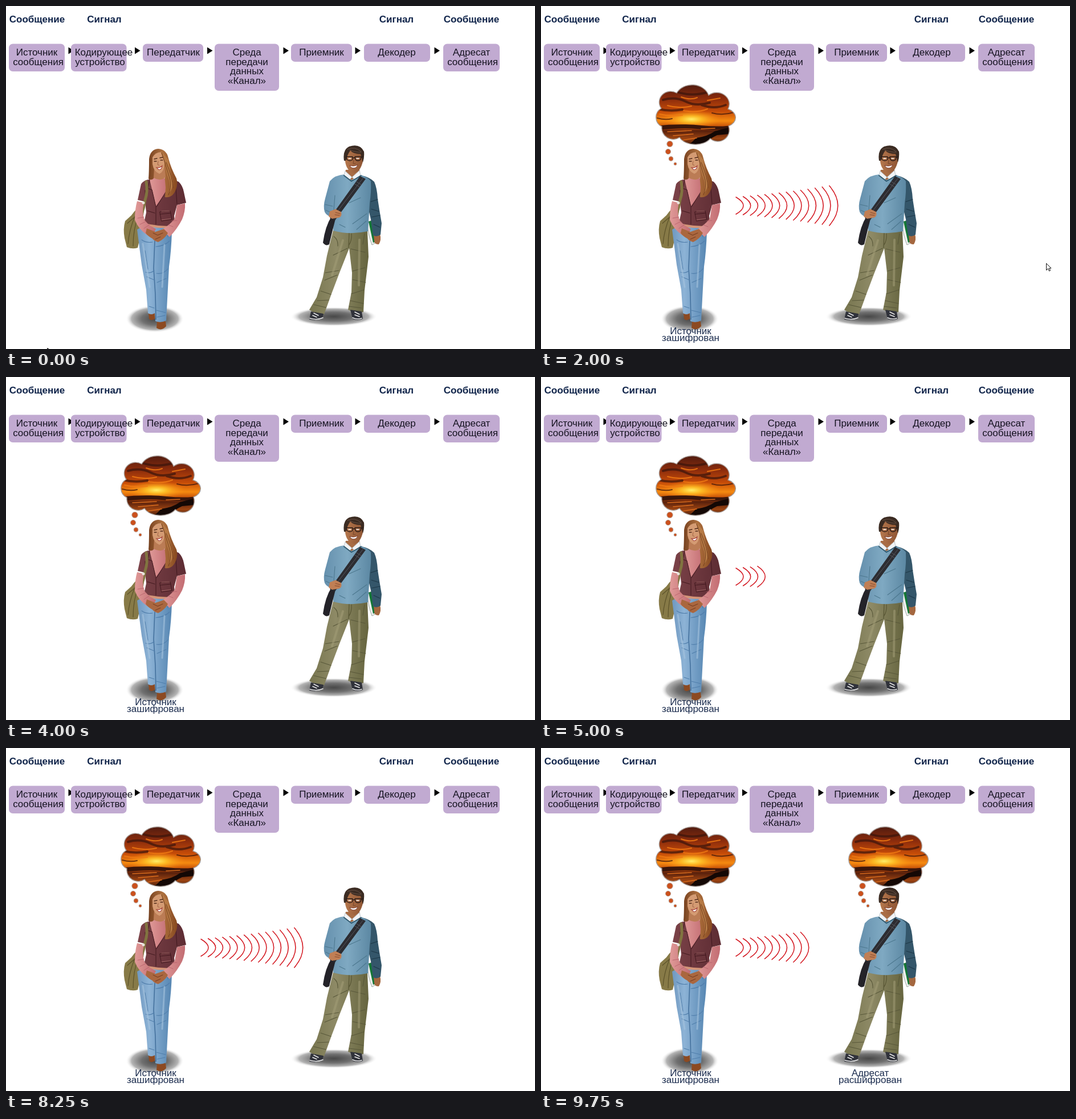
An HTML page for the animation above (10000 ms loop, 928 by 603 pixels).

```html
<!DOCTYPE html>
<html lang="ru">
<head>
<meta charset="utf-8">
<title>Передача сообщения</title>
<style>
  html, body { margin: 0; width: 100%; height: 100%; overflow: hidden; background: #fff; }
  svg { display: block; }
  text { font: 17px "Liberation Sans", Arial, sans-serif; text-anchor: middle; fill: #151320; }
  .title { font-weight: bold; fill: #10244a; }
  .caption { fill: #1b2c4e; }
  .line { fill: none; stroke-linecap: round; stroke-linejoin: round; }
</style>
</head>
<body>
<svg width="928" height="603" viewBox="0 0 928 603">
  <defs>
    <radialGradient id="shade">
      <stop offset="0" stop-color="#484848"/><stop offset=".45" stop-color="#707070"/>
      <stop offset=".8" stop-color="#b4b4b4"/><stop offset="1" stop-color="#fff" stop-opacity="0"/>
    </radialGradient>
    <linearGradient id="sky" x2="0" y2="1">
      <stop offset="0" stop-color="#4a1a10"/><stop offset=".25" stop-color="#8c2c0c"/>
      <stop offset=".45" stop-color="#c64c08"/><stop offset=".6" stop-color="#f58a10"/>
      <stop offset=".7" stop-color="#c04a08"/><stop offset=".76" stop-color="#58200c"/>
      <stop offset=".88" stop-color="#9c4412"/><stop offset="1" stop-color="#341208"/>
    </linearGradient>
    <radialGradient id="sun">
      <stop offset="0" stop-color="#fff06a"/><stop offset=".35" stop-color="#ffc428" stop-opacity=".85"/>
      <stop offset="1" stop-color="#ff8a10" stop-opacity="0"/>
    </radialGradient>
    <linearGradient id="denim"><stop offset="0" stop-color="#6f98c0"/><stop offset=".35" stop-color="#8db3d6"/><stop offset="1" stop-color="#5686b2"/></linearGradient>
    <linearGradient id="hair"><stop offset="0" stop-color="#794321"/><stop offset=".5" stop-color="#ad703f"/><stop offset="1" stop-color="#87491f"/></linearGradient>
    <linearGradient id="jacket"><stop offset="0" stop-color="#7b4248"/><stop offset="1" stop-color="#5d2c33"/></linearGradient>
    <linearGradient id="pink"><stop offset="0" stop-color="#e09a98"/><stop offset="1" stop-color="#c26c72"/></linearGradient>
    <linearGradient id="knit"><stop offset="0" stop-color="#6590ad"/><stop offset=".5" stop-color="#7fa9c2"/><stop offset="1" stop-color="#5c88a3"/></linearGradient>
    <linearGradient id="khaki"><stop offset="0" stop-color="#77754f"/><stop offset=".45" stop-color="#8e8a66"/><stop offset="1" stop-color="#66653f"/></linearGradient>
    <linearGradient id="skin"><stop offset="0" stop-color="#b5774d"/><stop offset="1" stop-color="#8f5634"/></linearGradient>
    <path id="puff" d="M238,153A30 25 0 0 1 294,157A22 20 0 0 1 328,181A22 16.5 0 0 1 329,211A20 20 0 0 1 297,233A30 20 0 0 1 243,231A20 20 0 0 1 212,212A18 18 0 0 1 211,180A20 19 0 0 1 238,153Z"/>
    <clipPath id="puffClip"><use href="#puff"/></clipPath>
    <g id="thought">
      <g clip-path="url(#puffClip)">
        <rect x="198" y="136" width="146" height="110" fill="url(#sky)"/>
        <ellipse cx="264" cy="199" rx="52" ry="16" fill="url(#sun)"/>
        <g class="line" stroke="#3a140c" stroke-opacity=".7" stroke-width="4">
          <path d="M236,150q25,10 55,2M214,165q22,-6 40,3t42,2M282,174q22,8 42,0M206,181q20,5 42,1"/>
          <path d="M300,188q18,5 38,-1M204,197q14,4 26,1" stroke-width="2"/>
        </g>
        <g class="line" stroke="#f07a12" stroke-width="2" stroke-opacity=".85">
          <path d="M246,160q16,6 28,1M222,175q20,6 42,1M250,184q25,4 42,-3M292,166l22,-4M208,190q20,5 40,2"/>
        </g>
        <path d="M198,211q45,-5 84,-1t62,-2v8q-40,3 -70,0t-76,3z" fill="#3a160b"/>
        <path d="M328,214l-23,6q-12,9 -33,12l-12,12h23q15,-12 26,-17l21,-2z" fill="#140805"/>
        <path class="line" d="M222,221l42,-2M232,228l35,-3M248,236l25,-4M281,216l24,-1" stroke="#d86a1c" stroke-width="1.6"/>
      </g>
      <use href="#puff" fill="none" stroke="#a59a95" stroke-width="1.4"/>
      <g fill="#cb501c" stroke="#b9a69c">
        <circle cx="226" cy="242.5" r="5.2"/><circle cx="223" cy="256" r="4.6"/>
        <circle cx="228" cy="268.5" r="3.9"/><circle cx="235.5" cy="277.5" r="2.4"/>
      </g>
    </g>
  </defs>

  <rect width="928" height="603" fill="#fff"/>
  <g id="scheme"></g>

  <ellipse cx="261" cy="550" rx="51" ry="24" fill="url(#shade)"/>
  <ellipse cx="575" cy="546" rx="76" ry="17" fill="url(#shade)"/>

  <g id="woman">
    <path d="M250,540q5,-4 11,0l1,9q-6,6 -11,1zM265,555q8,-4 15,0l1,8q-8,9 -17,3z" fill="#8c4a22"/>
    <path d="M240,348q-11,7 -20,20l-11,10q-4,14 -1,30l4,16q10,4 19,1l5,-22q4,-25 6,-43z" fill="#877a47"/>
    <path class="line" d="M226,370q-10,24 -12,48M232,370q-9,22 -9,52M213,382l14,-12" stroke="#5d532b" stroke-width="1.2"/>
    <path d="M239,388h49l3,8q-1,34 -5,62l-2,38 -3,57q-10,5 -19,1l-1,-14q-6,4 -12,0l-3,-41 -8,-44 -8,-62z" fill="url(#denim)"/>
    <path class="line" d="M261,413l-2,48 3,46 1,44" stroke="#44719d" stroke-width="1.6"/>
    <path class="line" d="M245,468q8,3 15,-3M247,476l14,6M264,470q12,2 20,-8M265,486l16,-7M251,528l9,3M264,535l16,4M265,547l14,-3M238,411q8,6 19,4M263,423q15,-1 24,-10M280,393l4,13M244,430l5,33" stroke="#507eab" stroke-width="1.1"/>
    <path class="line" d="M240,418l12,76M278,420l-4,74" stroke="#a5c4de" stroke-opacity=".6" stroke-width="3"/>
    <path d="M242,382l49,2 -2,6q-23,1 -47,-3z" fill="#d49578"/>
    <path d="M251,304q15,-5 32,0l3,28 -22,24 -9,-22z" fill="url(#pink)"/>
    <path d="M252,305l11,47 23,-32 -3,-16q11,1 20,5 7,7 9,18l4,19 -16,4 -5,19 2,17q-29,3 -55,-5l4,-18 -2,-19 -13,-3 6,-28q6,-8 15,-8z" fill="url(#jacket)"/>
    <path class="line" d="M252,305l-3,16 7,2 7,30v31M283,305l6,15 -7,4 -18,29M270,362l18,-2 3,15 -18,3zM270,366l19,-2M298,321l2,27M244,324l1,22M248,360l13,4" stroke="#41181e" stroke-width="1"/>
    <path class="line" d="M273,361l14,-1M273,376l16,-2" stroke="#b87c78" stroke-width=".7"/>
    <path class="line" d="M246,309q3,18 -2,32 -2,14 -7,28" stroke="#817440" stroke-width="5"/>
    <path d="M230,343l12,3q-4,18 1,30 7,10 20,16l-5,10 -10,1q-16,-11 -22,-27 0,-19 4,-33z" fill="url(#pink)"/>
    <path d="M300,350l14,-3q1,13 -5,28 -8,16 -22,31l-13,-13q14,-9 22,-19z" fill="url(#pink)"/>
    <path class="line" d="M231,373l11,-2M235,384l10,-5M242,391l9,-6M300,377l-9,1M293,388l-8,-3" stroke="#b8636c" stroke-width=".9"/>
    <path d="M247,391l15,6 15,-5 7,7q-5,10 -17,16 -7,-2 -10,-6 -8,-4 -12,-10z" fill="#aa673f"/>
    <path class="line" d="M258,399l8,4 9,-4M262,410l9,-4" stroke="#71391e" stroke-width="1"/>
    <circle cx="241" cy="346" r="2.5" fill="#e8e2dc"/>
    <path d="M267,251q-14,1 -16,18 0,22 -1,35 7,4 11,-4l17,-3 2,22 -1,17q13,2 19,-13 4,-10 1,-20 -10,-19 -14,-35 -3,-16 -18,-17z" fill="url(#hair)"/>
    <path d="M260,286l18,-5 2,20q-9,8 -21,1z" fill="#bb7c55"/>
    <path d="M257,266q5,-9 15,-9 6,8 6,20 -1,15 -9,18 -10,-4 -12,-17z" fill="#d49b73"/>
    <path d="M271,254q3,12 8,20 1,17 7,32 3,13 -1,24 10,-10 7,-24 -5,-20 -7,-36z" fill="#b67a45"/>
    <path class="line" d="M273,258q9,27 15,48 2,14 -3,26M253,270l-1,30M281,275q11,25 12,45" stroke="#74401e" stroke-width="1"/>
    <path class="line" d="M260,269l5,-1M270,267l5,-1M260,273h4M271,271h4" stroke="#4f2b1b" stroke-width="1.3"/>
    <path class="line" d="M267,273l-1,6 3,1" stroke="#a26344" stroke-width="1"/>
    <path d="M264,284q6,1 10,-3 -1,7 -6,7z" fill="#fff" stroke="#a84840" stroke-width="1.2"/>
  </g>

  <g id="man">
    <path d="M574,394l60,2 2,45 -7,59 -2,38q-13,3 -27,-4l6,-31 1,-34 -5,-43 -17,43 -14,37 -13,36q-13,1 -26,-8l13,-22 11,-35 7,-38z" fill="url(#khaki)"/>
    <path class="line" d="M602,398l-1,27M606,400q1,13 -5,21" stroke="#5a5836" stroke-width="1.3"/>
    <path class="line" d="M575,405q8,6 7,17M599,426l-25,12M584,465l-24,4M581,473l-22,9M570,507l-18,-6M566,517l-20,1M561,530l-21,-5M608,466l22,-6M608,481l23,5M606,506l22,-7M604,518l23,5M602,528l22,3M629,400l-3,19M605,427l25,6" stroke="#59583a" stroke-width="1.1"/>
    <path class="line" d="M591,412l-19,61M620,411l-1,80" stroke="#a29d77" stroke-opacity=".55" stroke-width="4"/>
    <path d="M535,537l22,4 -2,8q-10,5 -23,2zM604,534l20,3 2,13q-9,4 -18,0z" fill="#30323a"/>
    <path class="line" d="M533,549q12,4 23,-1M608,548q8,4 16,1M540,540l8,4M612,538l8,4M538,544l7,3M612,543l8,3" stroke="#e9e9e9" stroke-width="1.6"/>
    <path d="M633,380l12,-4 6,39 -9,5q-7,-18 -9,-40z" fill="#eef0ee" stroke="#88918b" stroke-width=".8"/>
    <path d="M636,379l9,-3 6,38 -7,2z" fill="#147636"/>
    <path d="M645,402l11,-1q3,10 -2,18 -8,0 -8,-6z" fill="#a4673f"/>
    <path d="M624,298q14,3 22,11 5,11 6,30 3,20 7,43l-2,20q-7,5 -13,1l-4,-28 -8,-34z" fill="#34566a"/>
    <path class="line" d="M640,344l12,-4M641,357l13,4M642,371l14,-3M645,384l11,5" stroke="#1d3848" stroke-width="1.2"/>
    <path d="M594,296q14,17 28,1 13,4 18,11 1,18 -2,39l-3,49q-32,7 -61,-1l1,-36 -5,12q-8,-3 -11,-9 -3,-10 1,-24l8,-30q9,-11 26,-12z" fill="url(#knit)"/>
    <path class="line" d="M577,333l-2,26M560,349l13,3M561,359l9,4M615,393l17,-15M608,383l25,-18M602,346l20,-9M585,384l10,5" stroke="#4d788f" stroke-width="1.1"/>
    <path d="M596,288l24,-1 1,10 -15,9 -12,-9z" fill="#a96d45"/>
    <path d="M595,290l12,11 -5,5 -9,-9zM620,289l-13,12 5,4 10,-8z" fill="#f2f4f6" stroke="#a9b5bd" stroke-width=".7"/>
    <path class="line" d="M593,298l13,10 17,-10" stroke="#325b70" stroke-width="2"/>
    <path d="M571,370q-11,17 -15,46 5,7 11,3l6,-25 5,-20z" fill="#242329"/>
    <path d="M621,299l10,5 -54,73 -9,-4z" fill="#2c2c31"/>
    <path class="line" d="M626,303l-53,69M615,309l8,5M612,313l8,5" stroke="#56565d" stroke-width="1"/>
    <path d="M568,361l10,-4 10,5q2,8 -4,10l-12,2 -6,-4z" fill="#c07f55"/>
    <path class="line" d="M578,363l8,2M577,367l8,1" stroke="#84482b" stroke-width="1"/>
    <path d="M595,260q6,-9 24,-7 8,5 7,20 -4,18 -15,21 -14,-4 -16,-21z" fill="url(#skin)"/>
    <path d="M593,272q-3,-19 9,-25 19,-6 26,9 1,10 -2,19l-4,-15q-13,0 -18,-6 -5,7 -8,18z" fill="#3b2b22"/>
    <path class="line" d="M599,252q13,-6 24,4M603,253q12,5 20,4" stroke="#685044" stroke-width="1"/>
    <g class="line" stroke="#2a1b17" stroke-width="1.3">
      <path d="M597,265h11v5q-5,4 -10,0zM612,265h11l-1,5q-5,4 -9,0zM608,267h4M623,266l3,-1"/>
      <path d="M601,268h4M615,268h4" stroke="#fff"/>
    </g>
    <path class="line" d="M610,271l-1,6h4" stroke="#75432b" stroke-width="1"/>
    <path d="M603,280q7,3 14,-1 -2,6 -7,6 -5,0 -7,-5z" fill="#fff" stroke="#7d3b2e" stroke-width="1"/>
  </g>

  <path id="waves" class="line" stroke="#d3161f" stroke-width="1.5"/>
  <g id="sent">
    <use href="#thought"/>
    <text class="caption" x="262.5" y="577">Источник</text>
    <text class="caption" x="262.5" y="589">зашифрован</text>
  </g>
  <g id="received">
    <use href="#thought" x="338"/>
    <text class="caption" x="577.5" y="577">Адресат</text>
    <text class="caption" x="577.5" y="589">расшифрован</text>
  </g>
  <path id="pointer" d="M886.5,452.5v12l3,-3 2,4.5 2,-1 -2,-4h3.5z" fill="#fff" stroke="#111"/>
  <path id="pointerTip" d="M72,601v2h4z" fill="#111"/>
</svg>
<script>
const LOOP = 10000, TICK = 250;
const byId = id => document.getElementById(id);

// left, right, bottom, then the label lines with their centres
const boxes = [
  [5, 103, 115, ['Источник', 54], ['сообщения', 56.5]],
  [114, 211.5, 115, ['Кодирующее', 171.5], ['устройство', 165]],
  [240, 346, 98, ['Передатчик', 293.5]],
  [366, 479, 149, ['Среда', 422.5], ['передачи', 422.5], ['данных', 422.5], ['«Канал»', 422.5]],
  [500, 607, 98, ['Приемник', 553.5]],
  [628, 744, 98, ['Декодер', 685.5]],
  [767, 866, 115, ['Адресат', 816.5], ['сообщения', 818.5]],
];
const titles = [['Сообщение', 54.5], ['Сигнал', 172.5], ['Сигнал', 685], ['Сообщение', 816.5]];
const arrows = [109.5, 226, 353, 486.5, 612.5, 751.5];

const label = (text, x, y, type = '') => `<text class="${type}" x="${x}" y="${y}">${text}</text>`;

byId('scheme').innerHTML =
  arrows.map(x => `<path d="M${x},72.5l9.5,6 -9.5,6z"/>`).join('') +
  boxes.map(([left, right, bottom, ...lines]) =>
    `<rect x="${left}" y="66.5" width="${right - left}" height="${bottom - 66.5}" rx="7" fill="#c1aad1"/>` +
    lines.map(([text, x], i) => label(text, x, 87 + i * 16.7)).join('')).join('') +
  titles.map(([text, x]) => label(text, x, 29, 'title')).join('');

function wave(i) {
  const x = 342 + i * 12.6, half = 15 + i * 0.95 + i * i * 0.045;
  return `M${x},${351 - half}Q${x + 26 + i * 0.3},351 ${x},${351 + half}`;
}

// Waves spread over 3.5 ticks: growing, full, then empty.
function waveCount(time) {
  if (time < 1500) return 0;
  const phase = ((time - 1500) / TICK) % 3.5;
  return phase >= 3 ? 0 : phase >= 2 ? 14 : 4 + 4 * phase;
}

const fade = (time, start) => Math.max(0, Math.min(1, (time - start) / 750));
const show = (id, visible) => byId(id).setAttribute('visibility', visible ? 'visible' : 'hidden');

function draw(now) {
  const time = Math.floor((now % LOOP) / TICK) * TICK;
  byId('waves').setAttribute('d', Array.from({ length: waveCount(time) }, (_, i) => wave(i)).join(''));
  byId('sent').setAttribute('opacity', fade(time, 500));
  byId('received').setAttribute('opacity', fade(time, 8250));
  show('pointer', time >= 1250 && time < 2500);
  show('pointerTip', time < TICK);
}

const start = performance.now();
function frame() {
  draw(performance.now() - start);
  requestAnimationFrame(frame);
}
frame();
</script>
</body>
</html>
```
